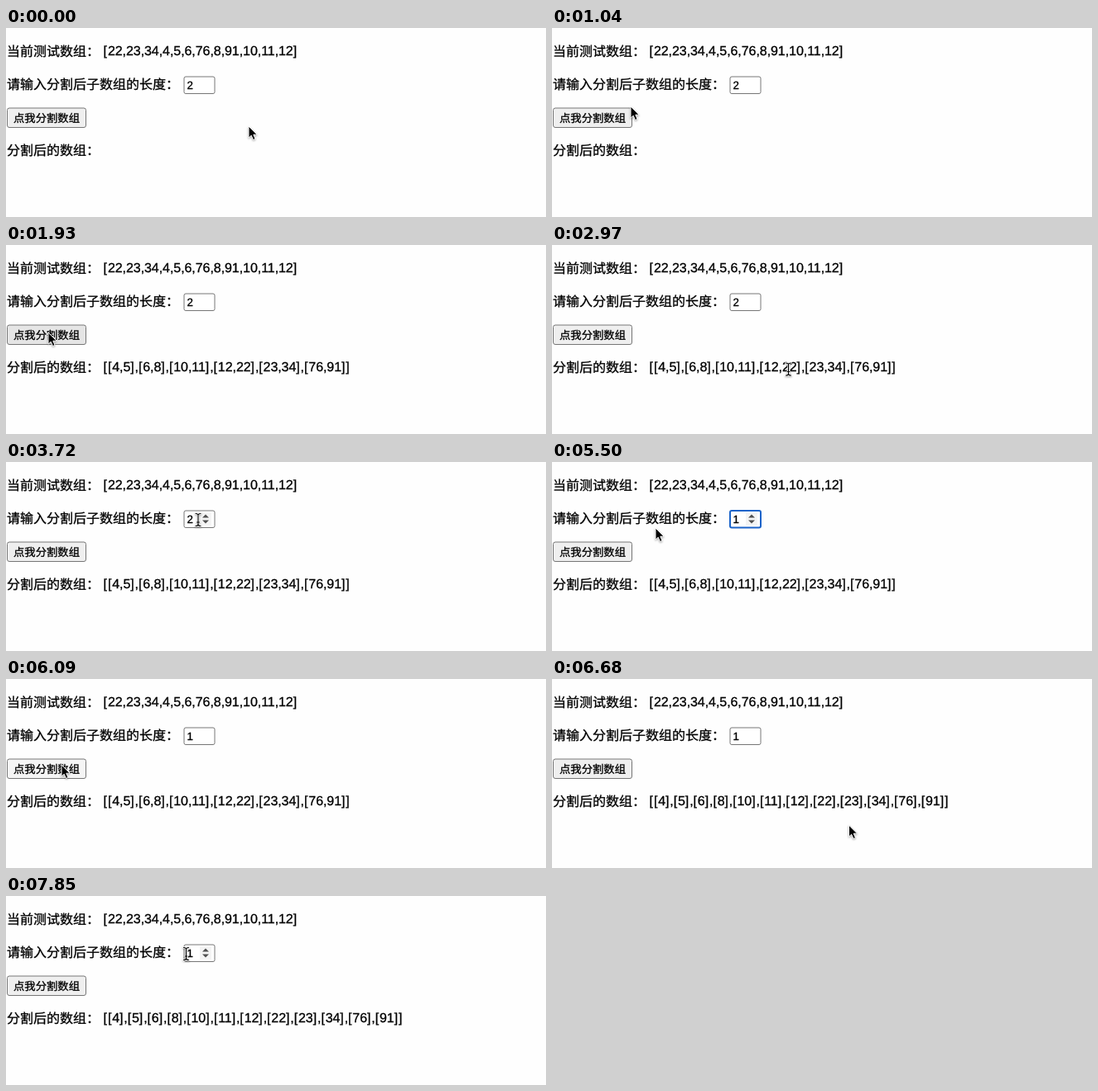
Write an HTML page that moves like this. It is 652 by 229 pixels and loops after 8 s.

```html
<!DOCTYPE html>
<html lang="zh-CN">
<head>
<meta charset="utf-8">
<title>分割数组</title>
<style>
html, body { margin: 0; width: 100%; height: 100%; overflow: hidden; background: #fefefe; }
svg { display: block; width: 652px; height: 229px; }
text {
  font: 16px "Liberation Sans", "Noto Sans CJK SC", sans-serif;
  letter-spacing: -.06px;
  text-rendering: geometricPrecision;
  white-space: pre;
  stroke: #000;
  stroke-width: .3px;
}
.zh { font-family: "Noto Sans CJK SC", sans-serif; letter-spacing: 0; }
.small { font-size: 13.333px; }
.br { letter-spacing: .85px; }
#arrow, #beam { filter: drop-shadow(0 1px 1px rgba(0, 0, 0, .35)); }
</style>
</head>
<body>
<svg viewBox="0 0 652 229">
  <text class="zh" x="1" y="33.6">当前测试数组：</text>
  <text id="source" x="117.6" y="33.2"></text>

  <text class="zh" x="1" y="73.6">请输入分割后子数组的长度：</text>
  <rect id="box" x="215" y="59" width="37" height="20.5" rx="2" fill="#fff" stroke="#767676"/>
  <text id="value" class="small" x="218.4" y="73.5"></text>
  <g id="spin">
    <rect x="234" y="61" width="14" height="16" fill="#f4f4f4"/>
    <path d="M237 67.5 L241 63.5 L245 67.5Z M237 70.5 L241 74.5 L245 70.5Z" fill="#505050"/>
  </g>

  <rect id="button" x="1.5" y="97" width="95" height="23.5" rx="2.5" stroke="#767676"/>
  <text class="zh small" x="9" y="113.7">点我分割数组</text>

  <text class="zh" x="1" y="153.6">分割后的数组：</text>
  <text id="result" x="117.6" y="153.2"></text>

  <path id="arrow" d="M0 0 V14.2 L3.2 11.2 L5.5 16.5 L8.1 15.4 L5.8 10.2 H10.2 Z"
        fill="#000" stroke="#fff" stroke-width="1"/>
  <g id="beam" fill="none" stroke-linecap="round">
    <path d="M-3 -7.5 Q0 -7.5 0 -5.5 V5.5 Q0 7.5 -3 7.5 M3 -7.5 Q0 -7.5 0 -5.5 M0 5.5 Q0 7.5 3 7.5 M-1.5 3 H1.5"
          stroke="#fff" stroke-width="2.4"/>
    <path d="M-3 -7.5 Q0 -7.5 0 -5.5 V5.5 Q0 7.5 -3 7.5 M3 -7.5 Q0 -7.5 0 -5.5 M0 5.5 Q0 7.5 3 7.5 M-1.5 3 H1.5"
          stroke="#000" stroke-width="1.1"/>
  </g>
</svg>
<script>
const LOOP = 8000, STEP = 148, LAST = 53;
const $ = id => document.getElementById(id);
const numbers = [22, 23, 34, 4, 5, 6, 76, 8, 91, 10, 11, 12];

// Pointer stops: [step, shape, x, y]; each holds until the next one.
const stops = [
  [0, 'arrow', 293, 119],
  [4, 'arrow', 262, 108], [5, 'arrow', 205, 93], [6, 'arrow', 140, 89],
  [7, 'arrow', 95, 95], [8, 'arrow', 64, 103], [9, 'arrow', 51, 106],
  [17, 'arrow', 75, 110], [18, 'arrow', 125, 124], [19, 'beam', 205, 144],
  [20, 'beam', 285.5, 150.5], [21, 'beam', 364, 153], [22, 'arrow', 340, 110],
  [23, 'arrow', 276, 80], [24, 'arrow', 241, 68],
  [25, 'beam', 232, 70], [26, 'beam', 229, 70], [27, 'beam', 225, 70],
  [28, 'beam', 222.5, 68.5], [31, 'beam', 166, 63],
  [32, 'none', 0, 0],
  [36, 'beam', 150, 67], [37, 'arrow', 125, 80], [38, 'arrow', 98, 91],
  [39, 'arrow', 80, 99], [40, 'arrow', 67, 104],
  [43, 'arrow', 142, 118], [44, 'arrow', 255, 158], [45, 'arrow', 358.4, 177],
  [46, 'arrow', 430, 177], [47, 'arrow', 483, 170], [48, 'arrow', 440, 160],
  [49, 'arrow', 340, 128], [50, 'arrow', 235, 98], [51, 'arrow', 166, 80],
  [52, 'arrow', 192, 73], [53, 'beam', 217.5, 70]
];

const within = (s, a, b) => s >= a && s <= b;
const show = (id, on) => { $(id).style.display = on ? '' : 'none'; };
const markup = list => JSON.stringify(list).replace(/[[\]]+/g, '<tspan class="br">$&</tspan>');

function split(list, size) {
  const sorted = [...list].sort((a, b) => a - b), parts = [];
  while (sorted.length) parts.push(sorted.splice(0, size));
  return parts;
}

function buttonFill(s) {
  if (s === 12 || s === 41) return '#f5f5f5';
  return within(s, 8, 16) || within(s, 39, 42) ? '#e5e5e5' : '#efefef';
}

function draw(s) {
  const focus = within(s, 30, 40);
  const box = $('box');
  box.setAttribute('stroke', focus ? '#1a63c9' : '#767676');
  box.setAttribute('stroke-width', focus ? 2 : 1);
  show('spin', within(s, 24, 40) || s === LAST);
  $('value').textContent = s < 32 ? 2 : 1;
  $('button').setAttribute('fill', buttonFill(s));
  $('result').innerHTML = s < 13 ? '' : markup(split(numbers, s < 42 ? 2 : 1));

  const [, shape, x, y] = stops.filter(p => p[0] <= s).pop();
  for (const id of ['arrow', 'beam']) {
    show(id, id === shape);
    $(id).setAttribute('transform', `translate(${x} ${y})`);
  }
}

$('source').innerHTML = markup(numbers);
const start = performance.now();
let shown = -1;

function tick(now) {
  const t = Math.max(0, now - start) % LOOP;
  const s = Math.min(LAST, Math.floor(t / STEP));
  if (s !== shown) draw(shown = s);
  requestAnimationFrame(tick);
}
tick(start);
</script>
</body>
</html>
```
